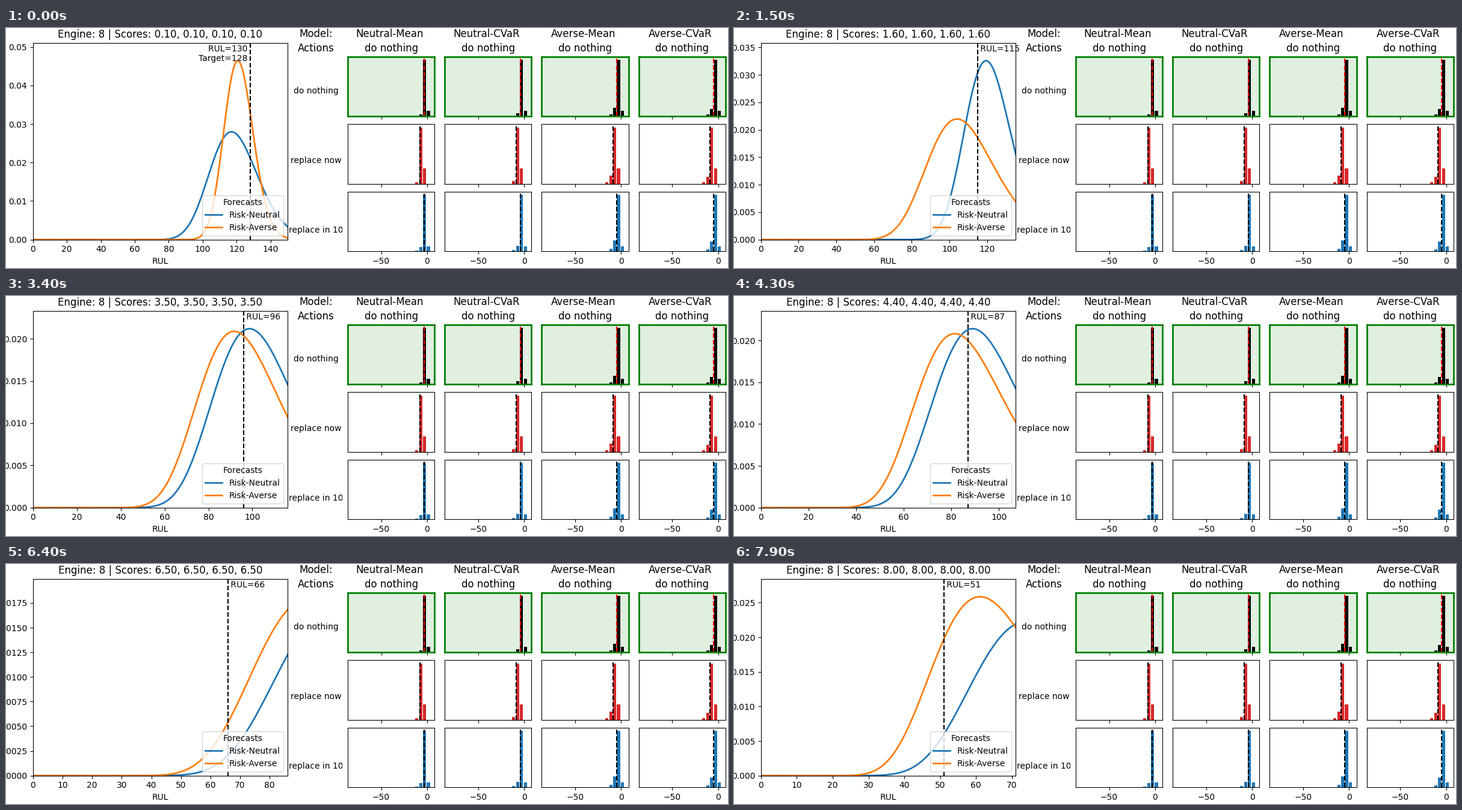
These frames come from a looping animation (1200x400 px, 8 s). A matplotlib script:

```python
import numpy as np
import matplotlib.pyplot as plt
from matplotlib.animation import FuncAnimation
from matplotlib.transforms import Bbox

W, H = 1200, 400
FRAMES, STEP_MS = 80, 100
START_RUL, TARGET_CAP, X_MARGIN = 130, 128, 20

# Log-normal forecasts: mode and log-sigma at a few steps.
KNOTS = [0, 15, 26, 43, 57, 64, 79]
FORECASTS = {
    "Risk-Neutral": ([117, 119.4, 107.3, 89, 98.9, 103.2, 74.5],
                     [.121, .102, .172, .205, .229, .217, .233]),
    "Risk-Averse": ([120.7, 104, 100.8, 81.5, 84.2, 94, 61.1],
                    [.071, .172, .182, .229, .255, .228, .245]),
}

# Model: name, size of the tail on the left, mean
MODELS = [("Neutral-Mean", 3, -3.4), ("Neutral-CVaR", 5, -4.2),
          ("Averse-Mean", 14, -4.6), ("Averse-CVaR", 12, -4.9)]
# Action: name, bar colour, right bar, extra tail, shift in bins
ACTIONS = [("do nothing", "black", 9, 0, 0),
           ("replace now", "C3", 26, 0, -1),
           ("replace in 10", "C0", 8, 4, 0)]

PANEL_W, PANEL_H = 144.2, 99.5
COL_STEP, ROW_STEP = 161.2, 112.5
BIN, PEAK_X, PEAK_H = 4.22, -2.85, 93.7
TAIL_DECAY, SMALLEST = 0.22, 1.5

fig = plt.figure(figsize=(W / 100, H / 100), dpi=100, facecolor="white")


def add_axes(x, y, w, h):
    """Axes placed in pixels from the top left corner."""
    return fig.add_axes([x / W, 1 - (y + h) / H, w / W, h / H])


def label(x, baseline, text, size):
    return fig.text(x / W, 1 - baseline / H, text, size=size,
                    ha="center", va="baseline")


def lognormal(x, mode, sigma):
    z = (np.log(x / mode) - sigma ** 2) / sigma
    return np.exp(-z ** 2 / 2) / (x * sigma * np.sqrt(2 * np.pi))


def histogram(right, tail):
    """Bar heights from right to left: right bar, peak, fading tail."""
    heights = [right, PEAK_H]
    while tail > SMALLEST:
        heights.append(tail)
        tail *= TAIL_DECAY
    return heights


def draw_panel(row, col):
    name, color, right, extra, shift = ACTIONS[row]
    _, tail, mean = MODELS[col]
    chosen = row == 0
    ax = add_axes(568 + COL_STEP * col, 47.6 + ROW_STEP * row,
                  PANEL_W, PANEL_H)
    heights = histogram(right, tail + extra)
    bins = shift + 1 - np.arange(len(heights))
    ax.bar(PEAK_X + BIN * bins, heights, width=0.8 * BIN, color=color)
    mean += BIN * shift
    ax.plot([mean, mean], [0, 96.7], "--", lw=1.5,
            color="red" if chosen else "black")
    ax.set(xlim=(-86.3, 8), ylim=(0, PANEL_H), xticks=[-50, 0], yticks=[])
    ax.tick_params(labelbottom=row == len(ACTIONS) - 1)
    if chosen:
        ax.set_title(name)
        ax.set_facecolor(("green", 0.12))
        for spine in ax.spines.values():
            spine.set(color="green", linewidth=2)


# Table of actions and models
label(515, 15.3, "Model:", 12)
label(515, 39.3, "Actions", 12)
for row, action in enumerate(ACTIONS):
    text = label(515, 108.7 + 116 * row, action[0], 10)
    text.set_clip_box(Bbox([[0, 0], [559, H]]))
    text.set_clip_on(True)
for col, model in enumerate(MODELS):
    label(637.2 + COL_STEP * col, 15.3, model[0], 12)
    for row in range(len(ACTIONS)):
        draw_panel(row, col)

# Forecast chart
chart = add_axes(44.8, 24.7, 423, 328)
chart.set_xlabel("RUL")
grid = np.linspace(0.5, 200, 400)
curves = {name: chart.plot([], [], lw=2, label=name)[0] for name in FORECASTS}
marker = chart.axvline(0, color="black", ls="--", lw=1.5)
note = chart.text(0, 0.99, "", va="top", transform=chart.get_xaxis_transform())
chart.legend(handles=list(curves.values()), title="Forecasts",
             loc="lower right")


def update(i):
    rul = START_RUL - i
    target = min(rul, TARGET_CAP)
    peak = 0
    for name, (modes, sigmas) in FORECASTS.items():
        pdf = lognormal(grid, np.interp(i, KNOTS, modes),
                        np.interp(i, KNOTS, sigmas))
        curves[name].set_data(np.r_[0, grid], np.r_[0, pdf])
        peak = max(peak, pdf.max())
    chart.set_xlim(0, rul + X_MARGIN)
    chart.set_ylim(0, 1.1 * peak)
    marker.set_xdata([target, target])
    note.set_x(target)
    if rul > target:
        note.set(text=f"RUL={rul} \nTarget={target} ", ha="right")
    else:
        note.set(text=f" RUL={rul}", ha="left")
    scores = ", ".join([f"{(i + 1) / 10:.2f}"] * len(MODELS))
    chart.set_title(f"Engine: 8 | Scores: {scores}")
    return [*curves.values(), marker, note]


anim = FuncAnimation(fig, update, frames=FRAMES, interval=STEP_MS, repeat=True)
plt.show()
```
